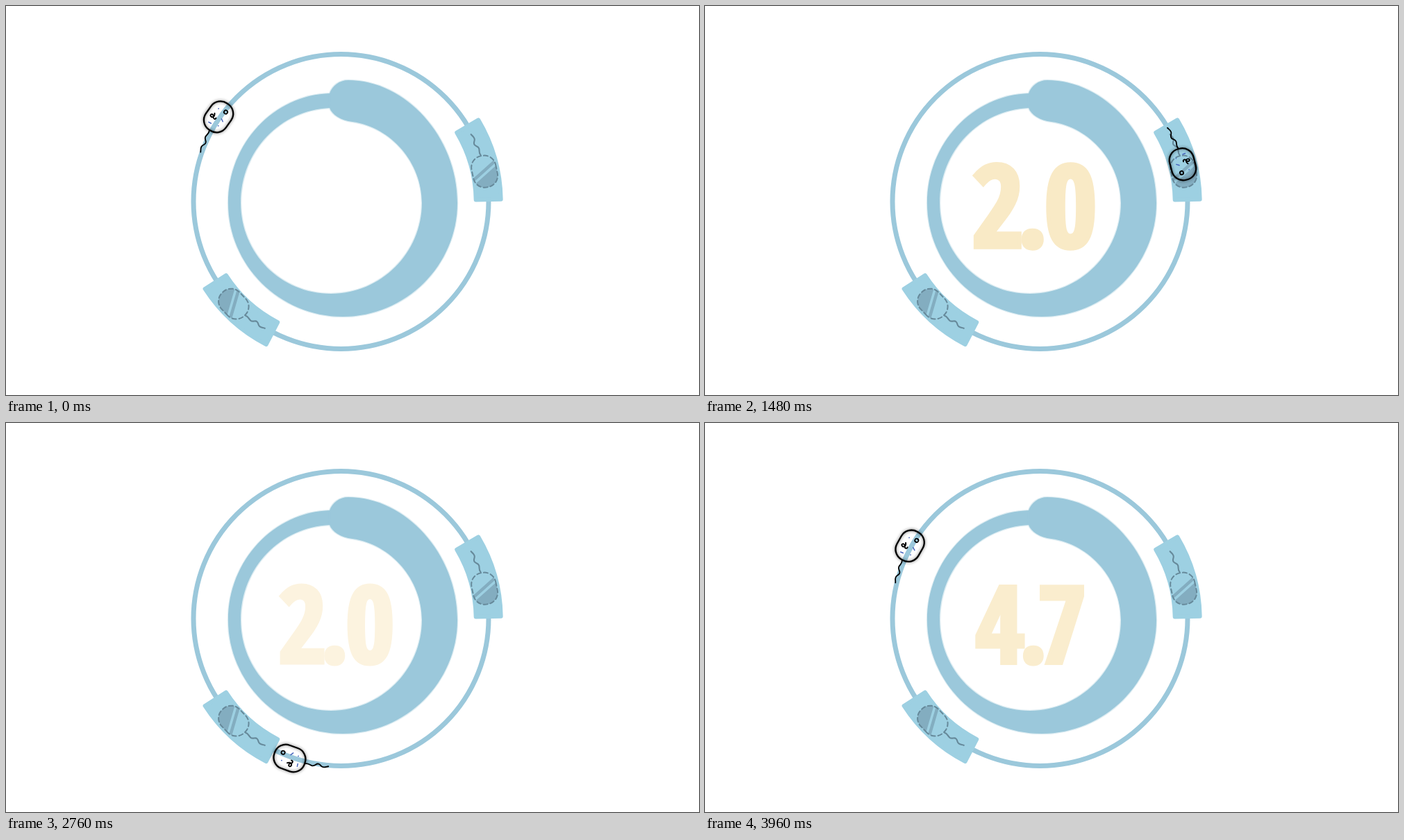
Animation, 998 px wide and 561 px high, one loop 4000 ms. Source, as an HTML page with a canvas:

```html
<!DOCTYPE html>
<html lang="en">
<head>
<meta charset="utf-8">
<title>Orbit loop</title>
<style>
  html, body { margin: 0; width: 100%; height: 100%; overflow: hidden; background: #fff; }
  canvas { display: block; width: 100%; height: 100%; }
</style>
</head>
<body>
<canvas id="stage" width="998" height="561"></canvas>
<script>
const ctx = document.getElementById('stage').getContext('2d');
const LOOP = 4000, STEP = 40;
const BLUE = '#9bc8db', TAG = '#9dd0e2', SHADE = '#83adc0', DASH = '#66899a', GOLD = '#f1ce7b';
const HUB = { x: 481.2, y: 282.5, r: 213.8 };
const TAG_ANGLES = [78.1, 226.2];

// Degrees travelled at given ticks of a 30 per second clock
const TRAVEL = [[0, 0], [44, 130.3], [82, 254.9], [98, 302.1], [118, 354.5], [120, 360]];
const START = -55;

const swirl = new Path2D(`M467 126 C386 128 320 198 320 284 C320 374 394 448 485 448
  C576 448 650 374 650 284 C650 188 575 107 493 107 C480 107 470 115 466 126
  L466 147 C470 157 482 165 499 167 C555 175 599 226 599 284 C599 356 540 415 468 415
  C396 415 338 357 338 284 C338 208 396 150 466 147 L466 126 Z`);
const tail = new Path2D('M-24 .5 C-28 3 -30 .5 -34.5 1 C-39 2 -38 6.5 -42 6.5 C-46 6.5 -46 4 -49.5 4.5 C-53 5 -54 7 -56.5 8');
const mouth = new Path2D('M1 -7.5 C-1 -6 -3 -5.5 -4.5 -6.2 C-7 -8 -5.5 -11.5 -3.4 -11 C-1 -10 -2 -7 -4.5 -6 C-7 -4.5 -6 -1.5 -3.4 -2');
const body = new Path2D();
body.roundRect(-23, -17.7, 46, 35.4, 16.7);

const rad = deg => deg * Math.PI / 180;
const clamp = v => Math.max(0, Math.min(1, v));
const ramp = (t, from, to) => clamp((t - from) / (to - from));

function travel(tick) {
  const i = TRAVEL.findIndex(k => k[0] > tick);
  const [a, from] = TRAVEL[i - 1], [b, to] = TRAVEL[i];
  return from + (to - from) * (tick - a) / (b - a);
}

function line(path, color, width) {
  ctx.strokeStyle = color;
  ctx.lineWidth = width;
  ctx.stroke(path);
}

function dot(x, y, r, color) {
  ctx.fillStyle = color;
  ctx.beginPath();
  ctx.arc(x, y, r, 0, 7);
  ctx.fill();
}

// Local x follows the orbit clockwise, local y points inwards
function onOrbit(deg, draw) {
  ctx.save();
  ctx.translate(HUB.x, HUB.y);
  ctx.rotate(rad(deg));
  draw();
  ctx.restore();
}

function drawRings() {
  const ring = new Path2D();
  ring.arc(482.5, 282, 212.5, 0, 7);
  line(ring, BLUE, 7);
  ctx.fillStyle = BLUE;
  ctx.fill(swirl);
  line(swirl, 'rgba(155,200,219,.35)', 2.5);
}

function drawTag(deg) {
  onOrbit(deg, () => {
    const sector = new Path2D(), from = rad(-108.8), to = rad(-79);
    sector.arc(0, 0, 231.5, from, to);
    sector.arc(0, 0, 195.5, to, from, true);
    sector.closePath();
    ctx.fillStyle = TAG;
    ctx.fill(sector);
    line(sector, TAG, 6);

    ctx.translate(0, -212.5);
    ctx.save();
    ctx.clip(body);
    ctx.rotate(rad(-30));
    ctx.fillStyle = SHADE;
    ctx.fillRect(4.5, -40, 40, 80);
    ctx.fillRect(-3.5, -40, 4.5, 80);
    ctx.restore();
    ctx.setLineDash([6, 4]);
    line(body, DASH, 2);
    ctx.setLineDash([]);
    line(tail, DASH, 2.1);
  });
}

function drawBug(deg) {
  onOrbit(deg, () => {
    ctx.translate(0, -HUB.r);
    line(tail, '#000', 1.8);
    ctx.shadowColor = 'rgba(0,0,0,.6)';
    ctx.shadowBlur = 4;
    line(body, '#000', 2.3);
    ctx.shadowBlur = 0;
    line(mouth, '#000', 1.9);
    const eye = new Path2D();
    eye.arc(11.6, 4.6, 2.6, 0, 7);
    line(eye, '#000', 1.8);
    line(new Path2D('M-14.3 -7.4 L-13.8 -3.4 M.2 5.2 L-2.2 9'), '#4a66bd', 1.5);
    dot(9.8, -6.8, .9, '#4a66bd');
    dot(-10.8, 7.2, .9, '#4a66bd');
  });
}

// Use the most condensed heavy face at hand, sized by its capital height
const FACES = [
  ['900 extra-condensed', '"Noto Sans"'],
  ['800 condensed', '"Open Sans"'],
  ['800 condensed', '"Open Sans Condensed", "Liberation Sans"'],
  ['800 condensed', '"Roboto Condensed", "Liberation Sans"'],
  ['700', '"Liberation Sans"']
];
const fontOf = ([style, family], size) => `${style} ${size}px ${family}, sans-serif`;

function pickFont(height) {
  const rated = FACES.map(face => {
    ctx.font = fontOf(face, 100);
    const m = ctx.measureText('4');
    return { face, cap: m.actualBoundingBoxAscent, ratio: m.width / m.actualBoundingBoxAscent };
  });
  const best = rated.reduce((a, b) => b.ratio < a.ratio ? b : a);
  ctx.font = fontOf(best.face, 100 * height / best.cap);
  const m = ctx.measureText('0');
  const gap = 66 - m.actualBoundingBoxRight - m.actualBoundingBoxLeft;
  return { font: ctx.font, edge: Math.max(0, Math.min(5, gap)) };
}

const type = pickFont(111);
const NUMBERS = [
  { text: '2.0', at: [426, 473.5, 524], pivot: [494, 318], start: 1300, full: 1720, rest: 2080, fade: 2480, gone: 2850, end: 2800 },
  { text: '4.7', at: [425, 473, 514.5], pivot: [477, 315], start: 2920, full: 3380, rest: 3400, fade: 3620, gone: 4160, end: 4000 }
];

function drawNumber(n, t) {
  if (t < n.start || t >= n.end) return;
  const size = 1.102 - .102 * ramp(t, n.start, n.rest);
  const [px, py] = n.pivot;
  ctx.save();
  ctx.globalAlpha = ramp(t, n.start, n.full) * (1 - ramp(t, n.fade, n.gone));
  ctx.translate(px, py);
  ctx.scale(size, size);
  ctx.translate(-px, -py);
  ctx.font = type.font;
  ctx.fillStyle = ctx.strokeStyle = GOLD;
  ctx.lineWidth = type.edge;
  ctx.lineJoin = 'miter';
  [...n.text].forEach((ch, i) => {
    const m = ctx.measureText(ch);
    const x = n.at[i] - (m.actualBoundingBoxRight - m.actualBoundingBoxLeft) / 2;
    ctx.fillText(ch, x, 346);
    if (type.edge && ctx.globalAlpha === 1) ctx.strokeText(ch, x, 346);
  });
  ctx.restore();
}

// Numbers are painted solid, then veiled in white, so overlaps never darken
function drawFaded(n, t) {
  const alpha = ramp(t, n.start, n.full) * (1 - ramp(t, n.fade, n.gone));
  const tint = [241, 206, 123].map(c => Math.round(255 + (c - 255) * alpha));
  if (t < n.start || t >= n.end || !alpha) return;
  const size = 1.102 - .102 * ramp(t, n.start, n.rest);
  const [px, py] = n.pivot;
  ctx.save();
  ctx.translate(px, py);
  ctx.scale(size, size);
  ctx.translate(-px, -py);
  ctx.font = type.font;
  ctx.fillStyle = ctx.strokeStyle = `rgb(${tint})`;
  ctx.lineWidth = type.edge;
  ctx.lineJoin = 'miter';
  [...n.text].forEach((ch, i) => {
    const m = ctx.measureText(ch);
    const x = n.at[i] - (m.actualBoundingBoxRight - m.actualBoundingBoxLeft) / 2;
    ctx.fillText(ch, x, 346);
    if (type.edge) ctx.strokeText(ch, x, 346);
  });
  ctx.restore();
}

function render(ms) {
  const n = Math.floor((ms % LOOP) / STEP + 1e-6) % (LOOP / STEP);
  const tick = Math.floor(n * 1.2 + 1e-6);
  ctx.fillStyle = '#fff';
  ctx.fillRect(0, 0, 998, 561);
  ctx.lineCap = 'round';
  ctx.lineJoin = 'round';
  drawRings();
  TAG_ANGLES.forEach(drawTag);
  NUMBERS.forEach(num => drawFaded(num, n * STEP));
  drawBug(START + travel(tick));
}

function loop() {
  render(performance.now());
  requestAnimationFrame(loop);
}
loop();
</script>
</body>
</html>
```
